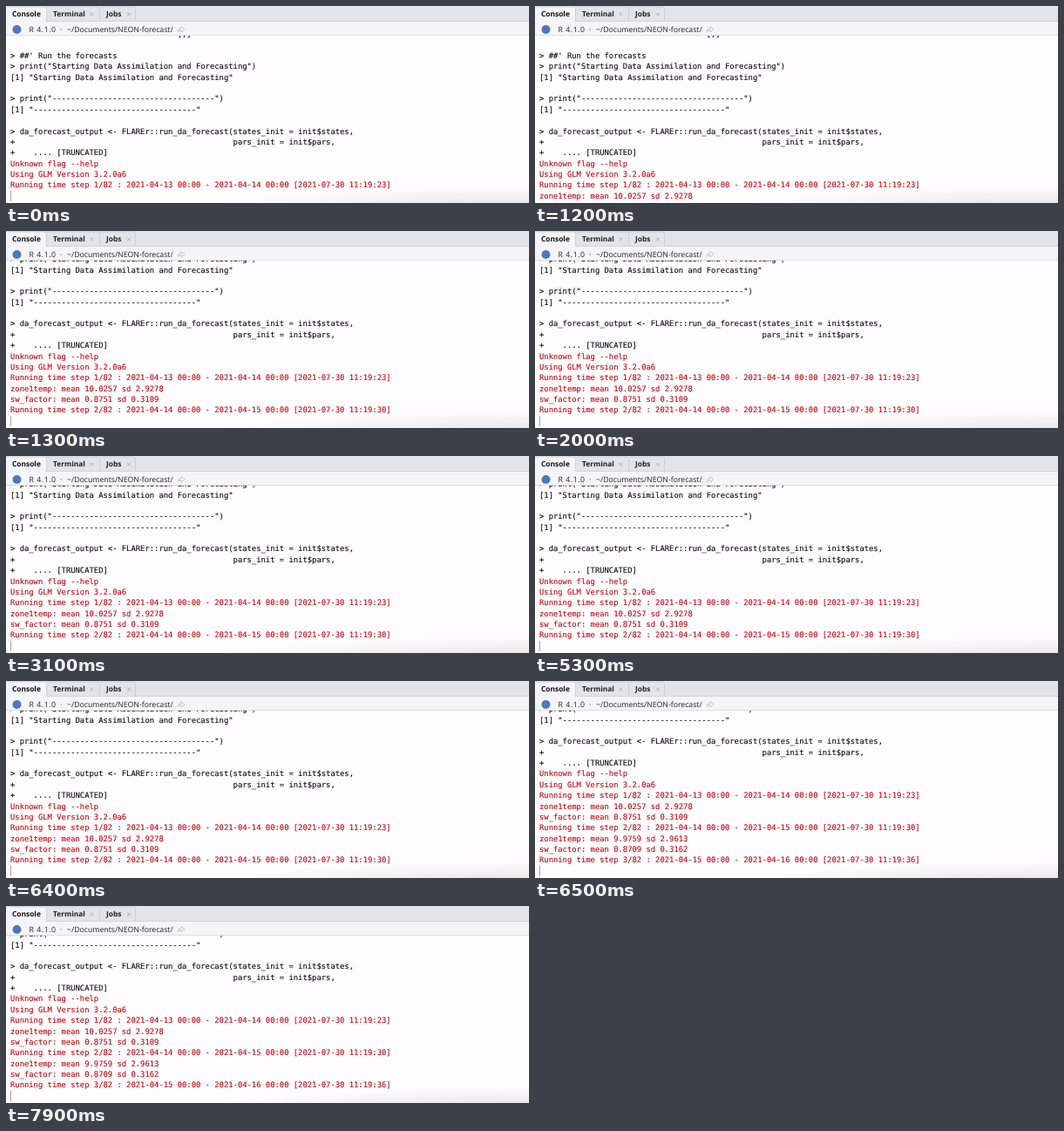
Animation of 600x226 px, one loop 8 s. Source, as an HTML page:

```html
<!DOCTYPE html>
<html lang="en">
<head>
<meta charset="utf-8">
<title>Console</title>
<style>
  html, body { margin: 0; width: 100%; height: 100%; overflow: hidden; background: #fff; }
  svg { display: block; width: 600px; height: 226px; }
  text { white-space: pre; text-rendering: geometricPrecision; }
  .ui { font: 8.73px "Open Sans", "Noto Sans", sans-serif; fill: #222; }
  .tab { font-size: 8.4px; font-weight: 700; }
  .mono { font: 8.858px "DejaVu Sans Mono", monospace; stroke-width: .14; }
  .out { fill: #111; stroke: #111; }
  .err { fill: #bd0d14; stroke: #bd0d14; }
</style>
</head>
<body>
<svg viewBox="0 0 600 226">
  <defs>
    <radialGradient id="shade" gradientUnits="userSpaceOnUse" cx="0" cy="0" r="1"
      gradientTransform="translate(600 236) scale(380 30)">
      <stop offset="0" stop-color="#000" stop-opacity=".12"/>
      <stop offset="1" stop-color="#000" stop-opacity="0"/>
    </radialGradient>
  </defs>
  <rect width="600" height="226" fill="#fffdff"/>
  <rect y="200" width="600" height="26" fill="url(#shade)"/>
  <g id="console" class="mono"></g>
  <path id="cursor" d="M5.5 212V224" stroke="#a5a5a8" stroke-width="1"/>

  <rect width="600" height="18" fill="#e3e4e9"/>
  <rect y="17" width="600" height="1" fill="#d3d5da"/>
  <rect y="18" width="600" height="15" fill="#f5f5f9"/>
  <rect y="33" width="600" height="1" fill="#dddee2"/>
  <path d="M0 18V1H44Q46.5 1 46.5 3.5V18Z" fill="#f5f5f9"/>
  <path d="M46.5 18V3.5Q46.5 1 44 1H0M107.5 17V3.5Q107.5 1 105 1H47M148.5 17V3.5Q148.5 1 146 1H108" fill="none" stroke="#c6c9cf" stroke-width=".8"/>
  <g class="ui">
    <text class="tab" x="7" y="12.2" fill="#111">Console</text>
    <text class="tab" x="54" y="12.2">Terminal</text>
    <text class="tab" x="115" y="12.2">Jobs</text>
    <text x="26.5" y="30.2" letter-spacing=".55">R 4.1.0</text>
    <text x="62" y="30.2">·</text>
    <text x="70" y="30.2">~/Documents/NEON-forecast/</text>
  </g>
  <path d="M96.5 7.7l3.6 3.6m0-3.6l-3.6 3.6M139.2 7.7l3.6 3.6m0-3.6l-3.6 3.6" stroke="#a9afb5" stroke-width="1"/>
  <circle cx="12.5" cy="27" r="5" fill="#4f78b5"/>
  <path d="M197 29.5Q197 25.7 201 25.7V23.5L205 26.7L201 29.9V27.8Q198.5 27.6 197 29.5Z" fill="#f6f8f9" stroke="#b4babf" stroke-width=".8"/>
</svg>
<script>
const LOOP = 8000, PITCH = 12.36, FIRST_BASE = 35.3, RED_FROM = 12;
const title = "Starting Data Assimilation and Forecasting";
const rule = "-".repeat(35);

const step = (n, time) =>
  `Running time step ${n}/82 : 2021-04-${12 + n} 00:00 - 2021-04-${13 + n} 00:00 [2021-07-30 11:19:${time}]`;
const stats = (name, mean, sd) => `${name}: mean ${mean} sd ${sd}`;

const lines = [
  " ".repeat(36) + "[,]",
  "",
  "> ##' Run the forecasts",
  `> print("${title}")`,
  `[1] "${title}"`,
  "",
  `> print("${rule}")`,
  `[1] "${rule}"`,
  "",
  "> da_forecast_output <- FLAREr::run_da_forecast(states_init = init$states,",
  "+".padEnd(48) + "pars_init = init$pars,",
  "+    .... [TRUNCATED]",
  "Unknown flag --help",
  "Using GLM Version 3.2.0a6",
  step(1, 23),
  stats("zone1temp", "10.0257", "2.9278"),
  stats("sw_factor", "0.8751", "0.3109"),
  step(2, 30),
  stats("zone1temp", "9.9759", "2.9613"),
  stats("sw_factor", "0.8709", "0.3162"),
  step(3, 36)
];

// Each state: start time, lines printed, lines scrolled off, cursor shown
const states = [
  { at: 0, count: 15, scroll: 0, cursor: true },
  { at: 1200, count: 16, scroll: 0, cursor: false },
  { at: 1300, count: 18, scroll: 3, cursor: true },
  { at: 6500, count: 21, scroll: 6, cursor: true }
];

const box = document.getElementById("console");
const cursor = document.getElementById("cursor");
const rows = lines.map((line, i) => {
  const row = document.createElementNS("http://www.w3.org/2000/svg", "text");
  row.textContent = line;
  row.setAttribute("x", 5);
  row.setAttribute("y", FIRST_BASE + i * PITCH);
  row.setAttribute("class", i < RED_FROM ? "out" : "err");
  return box.appendChild(row);
});

function draw(ms) {
  const state = states.filter(s => s.at <= ms).pop();
  box.setAttribute("transform", `translate(0 ${-state.scroll * PITCH})`);
  rows.forEach((row, i) => {
    const shown = i >= state.scroll && i < state.count;
    row.setAttribute("visibility", shown ? "visible" : "hidden");
  });
  cursor.setAttribute("visibility", state.cursor ? "visible" : "hidden");
}

const start = performance.now();
function tick() {
  draw((performance.now() - start) % LOOP);
  requestAnimationFrame(tick);
}
tick();
</script>
</body>
</html>
```
